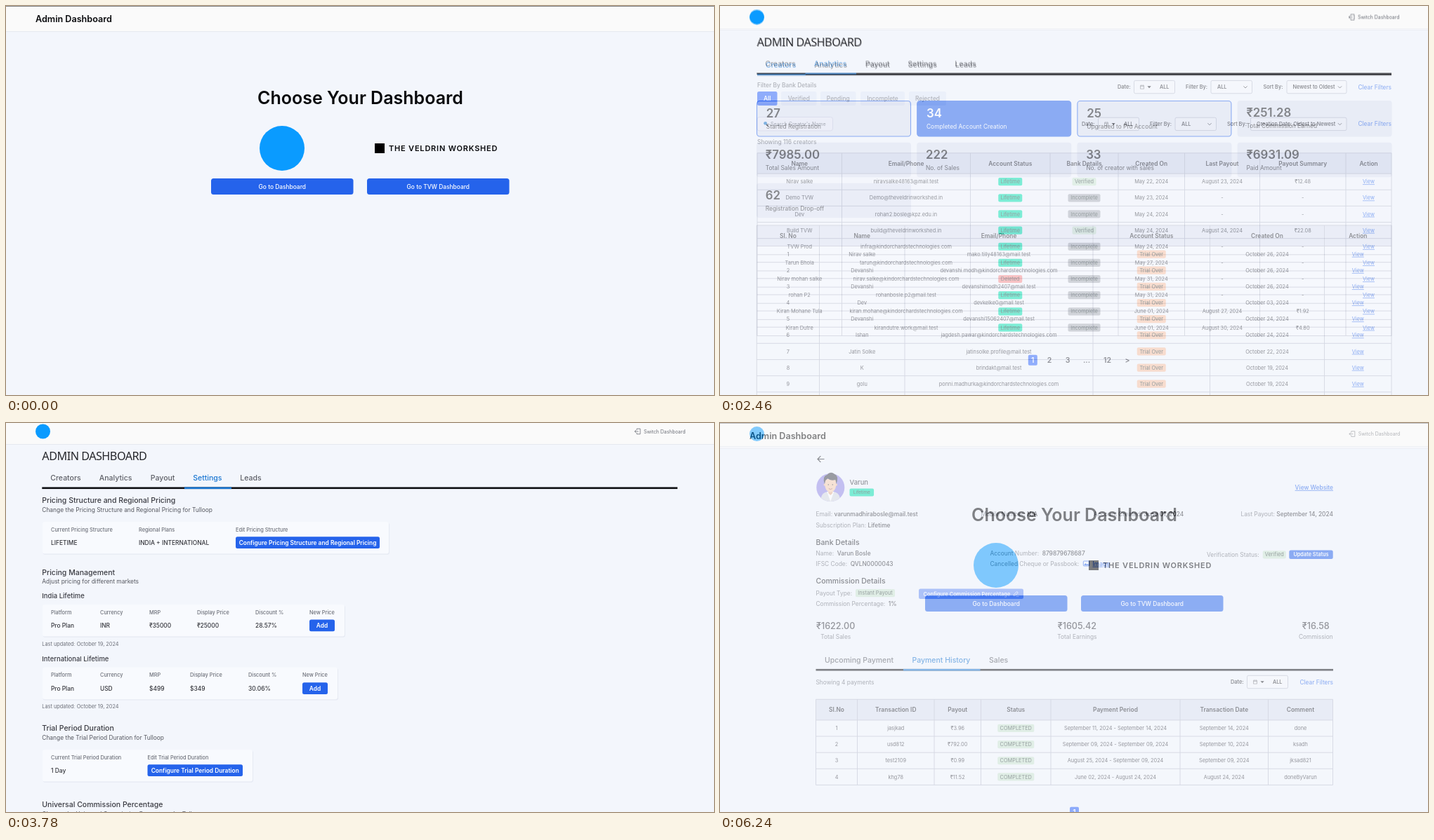
Animation, 1008 px wide and 555 px high, one loop 6300 ms. Source, as an HTML page:

```html
<!DOCTYPE html>
<html lang="en">
<head>
<meta charset="utf-8">
<title>Admin Dashboard</title>
<style>
html, body { margin: 0; width: 100%; height: 100%; overflow: hidden; background: #f3f6fc; }
svg { display: block; width: 1008px; height: 555px; }
text { font-family: Inter, sans-serif; white-space: pre; }
</style>
</head>
<body>
<svg id="stage" viewBox="0 0 1008 555" xmlns="http://www.w3.org/2000/svg"></svg>
<script>
const BLUE = '#2563eb', TAB = '#1976d2', INK = '#1c1c20', BODY = '#3a3b42', GREY = '#6d7079';
const HEAD = '#dfe4f2', LINE = '#b8bbcb', GREEN = '#05e3af', PALE = '#cfe8d2';
const S = 7.35, M = 8.4, L = 10.5;

// y is the middle of the capitals
function text(x, y, str, size = S, fill = BODY, weight = 400, anchor = 'start', extra = '') {
  return `<text x="${x}" y="${(y + size * 0.364).toFixed(2)}" font-size="${size}" fill="${fill}" font-weight="${weight}" text-anchor="${anchor}" ${extra}>${str}</text>`;
}
const mid = (x, y, str, size, fill, weight, extra) => text(x, y, str, size, fill, weight, 'middle', extra);
const rect = (x, y, w, h, fill, r = 0, extra = '') =>
  `<rect x="${x}" y="${y}" width="${w}" height="${h}" rx="${r}" fill="${fill}" ${extra}/>`;
const path = (d, stroke, w = 1, fill = 'none') =>
  `<path d="${d}" stroke="${stroke}" stroke-width="${w}" fill="${fill}"/>`;
const dot = (x, y, r, fill) => `<circle cx="${x}" cy="${y}" r="${r}" fill="${fill}"/>`;
const link = (x, y, str, size, weight = 400, anchor = 'middle') =>
  text(x, y, str, size, BLUE, weight, anchor, 'text-decoration="underline"');

function badge(x, y, w, str, fill, color = '#3b4a46', size = S) {
  return rect(x - w / 2, y - 5.6, w, 11.2, fill, 2) + mid(x, y, str, size, color);
}

function button(x, y, w, h, str, size = M, weight = 600, fill = BLUE, r = 2.5) {
  return rect(x, y, w, h, fill, r) + mid(x + w / 2, y + h / 2, str, size, '#fff', weight);
}

function backdrop(h, top = '') {
  return rect(0, 0, 1008, 555, '#f3f6fc') + rect(0, 0, 1008, h, '#fafafa') +
    rect(0, h, 1008, 0.8, '#e3e6ed') + top;
}

function topBar(h, y, dx = 0) {
  const x = 895.5 + dx;
  return backdrop(h) + dot(52.5, y, 10.5, '#0a9bff') +
    path(`M${x + 2.5} ${y - 1.8}V${y - 3.8}H${x + 7.5}V${y + 3.8}H${x + 2.5}V${y + 1.8}M${x + 5} ${y}H${x - 0.5}m2 -1.7l-2 1.7l2 1.7`, GREY, 0.8) +
    text(908 + dx, y, 'Switch Dashboard', 6.9, GREY);
}

function tabs(names, xs, y, active, lineY, x0, x1, a0, a1) {
  return names.map((n, i) => text(xs[i], y, n, L, i === active ? TAB : '#5d5f66', 500)).join('') +
    rect(x0, lineY - 1.3, x1 - x0, 2.6, '#0b0c10') + rect(a0, lineY - 1.3, a1 - a0, 2.6, TAB);
}

function mainTabs(x, titleY, y, active, lineY, a0, a1) {
  return text(x, titleY, 'ADMIN DASHBOARD', 16.2, '#26272b', 500, 'start',
      'style="font-family:\'Noto Sans\',sans-serif;letter-spacing:-.5px"') +
    tabs(['Creators', 'Analytics', 'Payout', 'Settings', 'Leads'],
      [12, 81.5, 154.5, 215, 282].map(d => d + x), y, active, lineY, x, 956, a0, a1);
}

const box = (x, y, w) => rect(x, y - 9.2, w, 18.4, '#f8f9fd', 2, `stroke="${LINE}" stroke-width=".9"`);
const chevron = (x, y) => path(`M${x - 2.6} ${y - 1.2}l2.6 2.6l2.6 -2.6`, '#33343a', 0.9);

function datePick(x, y) {
  return text(x, y, 'Date:', S, INK, 500) + box(x + 23.5, y, 58) +
    path(`M${x + 32.5} ${y - 2.2}h5v4.8h-5zM${x + 32.5} ${y - 0.8}h5M${x + 33.7} ${y - 3.2}v1M${x + 36.3} ${y - 3.2}v1`, '#55565c', 0.6) +
    path(`M${x + 42.5} ${y - 1.3}h5.2l-2.6 2.9z`, 'none', 0, INK) +
    text(x + 60, y, 'ALL', S, INK, 500);
}

function filters(x, y, sort, sortX) {
  return datePick(x, y) +
    text(x + 97, y, 'Filter By:', S, INK, 500) + box(x + 133, y, 58.5) +
    text(x + 142, y, 'ALL', S, INK, 500) + chevron(x + 182, y) +
    text(sortX - 33.5, y, 'Sort By:', S, INK, 500) + box(sortX, y, 892 - sortX) +
    text(sortX + 8.5, y, sort, S, INK, 500) + chevron(882.5, y) +
    text(956, y, 'Clear Filters', M, BLUE, 400, 'end');
}

const TONES = {
  Lifetime: [GREEN, 34], Deleted: ['#fb8c8c', 34], Verified: [PALE, 34], Incomplete: ['#adb0b8', 46],
  'Trial Over': ['#fcc3a2', 41], COMPLETED: [PALE, 52]
};

function table(cols, y, headH, heads, rows) {
  const rowH = 23.14, last = cols.length - 1, w = cols[last] - cols[0];
  const end = y + headH + rows.length * rowH;
  const cx = i => (cols[i] + cols[i + 1]) / 2;
  let out = rect(cols[0], y, w, end - y, '#f6f8fd') + rect(cols[0], y, w, headH, HEAD);
  let d = `M${cols[0]} ${y}h${w}`;
  for (let i = 0; i <= rows.length; i++) d += `M${cols[0]} ${y + headH + i * rowH}h${w}`;
  cols.forEach(x => d += `M${x} ${y}V${end}`);
  out += path(d, LINE, 0.9);
  heads.forEach((h, i) => out += mid(cx(i), y + headH / 2, h, M, '#292a30', 600));
  rows.forEach((row, r) => row.forEach((cell, i) => {
    const cy = y + headH + (r + 0.5) * rowH, tone = TONES[cell];
    out += tone ? badge(cx(i), cy, tone[1], cell, tone[0])
      : cell === 'View' ? link(cx(i), cy, cell, S) : mid(cx(i), cy, cell, S);
  }));
  return out;
}

function choosePage() {
  return backdrop(36, rect(0, 0, 1008, 1, '#85868a')) +
    text(42, 18.2, 'Admin Dashboard', 12.6, '#08090c', 600) +
    mid(504.5, 131, 'Choose Your Dashboard', 25, '#08090c', 600) +
    dot(393, 203, 32, '#0a9bff') + rect(525, 196, 14, 14, '#000') +
    text(545, 203, 'THE VELDRIN WORKSHED', 11, '#08090c', 600, 'start', 'letter-spacing=".8"') +
    button(292, 246, 202.5, 23, 'Go to Dashboard', M, 500, BLUE, 3.5) +
    button(514, 246, 202.5, 23, 'Go to TVW Dashboard', M, 500, BLUE, 3.5);
}

const MAIL = '@mail.test', FIRM = '@kindorchardstechnologies.com', SHED = '@theveldrinworkshed.in';

function creatorsPage() {
  const pill = (x, w, s) => rect(x, 122, w, 20, '#e4eaf8', 2.5) + mid(x + w / 2, 132, s, M, GREY, 500);
  const row = (name, mail, date, bank = 'Incomplete', paid = '-', sum = '-', state = 'Lifetime') =>
    [name, mail, state, bank, date + ', 2024', paid, sum, 'View'];
  const rows = [
    row('Nirav salke', 'niravsalke48163' + MAIL, 'May 22', 'Verified', 'August 23, 2024', '₹12.48'),
    row('Demo TVW', 'Demo' + SHED, 'May 23'),
    row('Dev', 'rohan2.bosle@kpz.edu.in', 'May 24'),
    row('Build TVW', 'build' + SHED, 'May 24', 'Verified', 'August 24, 2024', '₹22.08'),
    row('TVW Prod', 'infra' + FIRM, 'May 24'),
    row('Tarun Bhola', 'tarun' + FIRM, 'May 27'),
    row('Nirav mohan salke', 'nirav.salke' + FIRM, 'May 31', 'Incomplete', '-', '-', 'Deleted'),
    row('rohan P2', 'rohanbosle.p2' + MAIL, 'May 31'),
    row('Kiran Mohane Tula', 'kiran.mohane' + FIRM, 'June 01', 'Incomplete', 'August 27, 2024', '₹1.92'),
    row('Kiran Dutre', 'kirandutre.work' + MAIL, 'June 01', 'Incomplete', 'August 30, 2024', '₹4.80')
  ];
  const pages = [['2', 469], ['3', 495], ['...', 522], ['12', 551.5], ['&gt;', 580]];
  return topBar(34, 16.7) + mainTabs(53, 52, 84, 0, 98, 53, 121.8) +
    text(53, 113.3, 'Filter By Bank Details', M, GREY, 500) +
    button(53, 122, 28.5, 20, 'All', M, 600, '#2a62fb') +
    pill(87, 50.5, 'Verified') + pill(143, 50.5, 'Pending') + pill(200, 63, 'Incomplete') + pill(269, 53, 'Rejected') +
    rect(53, 158.5, 107.5, 19.5, '#fafaff', 3, 'stroke="#d5d5e6" stroke-width=".9"') +
    path('M66 168.8l2.6 2.6', '#33363d', 1.4) + dot(64.6, 167.3, 2.4, '#1f7fd0') +
    text(72, 168.3, "Search Creator's Name", 7.15, GREY) +
    filters(515, 168.4, 'Creation Date: Oldest to Newest', 755.5) +
    text(53, 194.3, 'Showing 116 creators', M, GREY, 500) +
    table([53, 173.5, 356.5, 470, 567, 661.5, 768.5, 891, 956], 209.8, 29.3,
      ['Name', 'Email/Phone', 'Account Status', 'Bank Details', 'Created On', 'Last Payout', 'Payout Summary', 'Action'], rows) +
    button(438.8, 497.8, 13, 15, '1', L, 600, '#2a62fb', 2) +
    pages.map(([s, x]) => mid(x, 505.4, s, L, '#303138', 600)).join('');
}

function analyticsPage() {
  const cards = [
    ['27', 'Started Registration', 1], ['34', 'Completed Account Creation', 2],
    ['25', 'Upgraded to Pro Account', 1], ['₹251.28', 'Total Commission Earned', 0],
    ['₹7985.00', 'Total Sales Amount', 0], ['222', 'No. of Sales', 0],
    ['33', 'No. of creator with sales', 0], ['₹6931.09', 'Paid Amount', 0],
    ['62', 'Registration Drop-off', 0]
  ].map(([num, label, kind], i) => {
    const x = 52 + (i % 4) * 228.2, y = [135, 194.8, 252.8][i >> 2], k = kind ? 1 : 0;
    const h = i < 4 ? 51.5 : 49.5;
    const frame = kind ? `stroke="${BLUE}" stroke-width="1.1"` : '';
    const [ink, sub] = kind === 2 ? ['#fff', '#fff'] : ['#15161a', '#26272c'];
    return rect(x + k / 2, y + k / 2, 220 - k, h - k, kind === 2 ? BLUE : HEAD, 4, frame) +
      text(x + 12.8 + k, y + 16.8 + k, num, 16.8, ink, 600) +
      text(x + 12.8 + k, y + 36.2 + k * 0.8, label, M, sub);
  }).join('');
  const rows = [
    ['Nirav salke', 'mako.tilly48163' + MAIL, 26], ['Devanshi', 'devanshi.modh' + FIRM, 26],
    ['Devanshi', 'devanshimodh2407' + MAIL, 26], ['Dev', 'devkelke0' + MAIL, '03'],
    ['Devanshi', 'devanshi15062407' + MAIL, 24], ['Ishan', 'jagdesh.pawar' + FIRM, 24],
    ['Jatin Solke', 'jatinsolke.profile' + MAIL, 22], ['K', 'brindakt' + MAIL, 19],
    ['golu', 'ponni.madhurka' + FIRM, 19], ['', '', 0]
  ].map(([name, mail, day], i) => day
    ? [i + 1, name, mail, 'Trial Over', `October ${day}, 2024`, 'View'] : []);
  return topBar(32, 15.2) + mainTabs(52.3, 51, 82.3, 1, 96.5, 121.5, 194) +
    filters(566, 115.6, 'Newest to Oldest', 807) + cards +
    table([52.3, 141.5, 263, 531, 697.5, 860.5, 956], 313, 29.5,
      ['Sl. No', 'Name', 'Email/Phone', 'Account Status', 'Created On', 'Action'], rows);
}

function settingsPage() {
  const card = (y, right) => rect(52.5, y + 1.2, right - 51.5, 45.5, '#e6eaf3', 3) +
    rect(52, y, right - 52, 45.5, '#f8fafe', 3);
  const label = (x, y, s) => text(x, y, s, S, GREY, 500);
  const value = (x, y, s) => text(x, y, s, M, '#34353b', 500);
  const section = (y, head, sub) => text(51.3, y, head, L, BODY, 500) + text(51.3, y + 13.4, sub, M, '#55575f');
  const change = s => `Change the ${s} for Tulloop`;
  const plan = (y, right, name, xs, vals) => text(51.3, y, name, 9.45, BODY, 500) + card(y + 12, right) +
    ['Platform', 'Currency', 'MRP', 'Display Price', 'Discount %', 'New Price']
      .map((s, i) => label(xs[i], y + 22.9, s)).join('') +
    vals.map((s, i) => value(xs[i], y + 42, s)).join('') +
    button(xs[5], y + 33.5, 36, 16.8, 'Add') +
    text(51.3, y + 68, 'Last updated: October 19, 2024', S, GREY);
  return topBar(30, 12) + mainTabs(51.3, 47, 78.5, 3, 92.8, 254, 321) +
    section(110.2, 'Pricing Structure and Regional Pricing', change('Pricing Structure and Regional Pricing')) +
    card(141, 545) + label(64, 152, 'Current Pricing Structure') + value(64, 170.7, 'LIFETIME') +
    label(189, 152, 'Regional Plans') + value(189, 170.7, 'INDIA + INTERNATIONAL') +
    label(327, 152, 'Edit Pricing Structure') +
    button(327, 162.3, 205, 16.8, 'Configure Pricing Structure and Regional Pricing') +
    section(212.7, 'Pricing Management', 'Adjust pricing for different markets') +
    plan(247, 482, 'India Lifetime', [64, 134, 204, 272, 355, 432], ['Pro Plan', 'INR', '₹35000', '₹25000', '28.57%']) +
    plan(336.7, 472, 'International Lifetime', [64, 134, 204, 262, 345, 422], ['Pro Plan', 'USD', '$499', '$349', '30.06%']) +
    section(435.3, 'Trial Period Duration', change('Trial Period Duration')) +
    card(466, 351) + label(64, 477, 'Current Trial Period Duration') + value(64, 496, '1 Day') +
    label(201.5, 477, 'Edit Trial Period Duration') +
    button(201.5, 487.3, 135.5, 16.8, 'Configure Trial Period Duration') +
    section(544.5, 'Universal Commission Percentage', change('Universal Commission Percentage'));
}

function avatar(x, y) {
  return `<g transform="translate(${x} ${y})">` + dot(0, 0, 20, '#9589e8') +
    path('M-13.5 14.7Q-12 7 -4 6H4Q12 7 13.5 14.7A20 20 0 0 1 -13.5 14.7z', 'none', 0, '#d9dbe2') +
    path('M-5 6L0 19.9L5 6z', 'none', 0, '#fff') +
    path('M-3 3H3V8L0 11L-3 8z', 'none', 0, '#eab28f') +
    dot(-8, -4, 1.8, '#f3c2a0') + dot(8, -4, 1.8, '#f3c2a0') +
    path('M-8 -12H8V-3Q7 6 0 7Q-7 6 -8 -3z', 'none', 0, '#f9d0b0') +
    path('M-8.5 -5Q-12 -16 -5 -18Q0 -24 6 -19Q12 -17 8.5 -5L7 -11Q0 -9 -4 -13L-7 -10z', 'none', 0, '#42434a') +
    dot(-3, -4, 0.8, '#42434a') + dot(3, -4, 0.8, '#42434a') +
    path('M-2.5 1.5Q0 3.8 2.5 1.5', '#a9645a', 0.9) + '</g>';
}

function detailPage() {
  const pair = (x, y, key, val, anchor) =>
    text(x, y, `${key}: <tspan fill="#34353b" font-weight="500">${val}</tspan>`, M, GREY, 400, anchor);
  const stat = (x, num, name) => mid(x, 289.5, num, 12.6, BODY, 500) + mid(x, 305, name, M, GREY);
  const head = (y, s) => text(136.5, y, s, L, '#26272c', 500);
  const row = (i, id, sum, span, day, note) => [i, id, '₹' + sum, 'COMPLETED', span, day + ', 2024', note];
  return topBar(33, 15.6, 0.8) +
    path('M148.5 51.5H139M143.3 47.2L139 51.5L143.3 55.8', '#26272c', 1.2) +
    avatar(157.3, 92) + text(184.5, 84.7, 'Varun', 9.45, BODY, 500) +
    badge(201.8, 99, 34.5, 'Lifetime', GREEN, '#2f4a44', 6.4) +
    link(873, 91.8, 'View Website', M, 500, 'end') +
    pair(136.5, 130.2, 'Email', 'varunmadhirabosle' + MAIL) + pair(371.5, 130.2, 'Mobile Number', 'N/A') +
    pair(532, 130.2, 'Account Created', 'June 01, 2024') + pair(873, 130.2, 'Last Payout', 'September 14, 2024', 'end') +
    pair(136.5, 145.7, 'Subscription Plan', 'Lifetime') +
    head(169.7, 'Bank Details') +
    pair(136.5, 186, 'Name', ' Varun Bosle') + pair(136.5, 200.5, 'IFSC Code', ' QVLN0000043') +
    pair(384.5, 186, 'Account Number', ' 879879678687') +
    text(384.5, 200.7, 'Cancelled Cheque or Passbook:', M, GREY) +
    rect(517.3, 197, 8.4, 7, 'none', 1, `stroke="${BLUE}" stroke-width=".9"`) +
    path('M518 203l2.4 -3l1.8 2l1.2 -1.2l2 2.2z', 'none', 0, BLUE) +
    link(530.5, 200.7, 'Image', M, 500, 'start') +
    text(693, 187.8, 'Verification Status:', M, GREY) + badge(789.3, 187.8, 33, 'Verified', PALE) +
    button(810.3, 181.5, 62.4, 12.6, 'Update Status', S) +
    head(225, 'Commission Details') +
    text(136.5, 242.6, 'Payout Type:', M, GREY) + badge(221, 242.6, 56, 'Instant Payout', PALE) +
    rect(283, 236.5, 149, 14.6, '#6a90f6', 2.5) +
    text(289.5, 243.9, 'Configure Commission Percentage', S, '#fff', 600) +
    path('M418 246.7l.5 -2l4.2 -4.2l1.6 1.6l-4.2 4.2zM421.5 247.2h4', '#fff', 0.8) +
    pair(136.5, 257.7, 'Commission Percentage', ' 1%') +
    stat(164.7, '₹1622.00', 'Total Sales') + stat(508.4, '₹1605.42', 'Total Earnings') + stat(848.3, '₹16.58', 'Commission') +
    tabs(['Upcoming Payment', 'Payment History', 'Sales'], [149, 273.5, 383], 338, 1, 352.2, 136.5, 873, 261, 370.5) +
    text(136.5, 369.6, 'Showing 4 payments', M, GREY) + datePick(727, 369.5) +
    text(873, 369.5, 'Clear Filters', M, BLUE, 400, 'end') +
    table([136.5, 195.5, 305, 371.5, 471, 655, 780.5, 872.5], 394.3, 29.6,
      ['Sl.No', 'Transaction ID', 'Payout', 'Status', 'Payment Period', 'Transaction Date', 'Comment'], [
        row(1, 'jasjkad', '3.96', 'September 11, 2024 - September 14, 2024', 'September 14', 'done'),
        row(2, 'usd812', '792.00', 'September 09, 2024 - September 09, 2024', 'September 10', 'ksadh'),
        row(3, 'test2109', '0.99', 'August 25, 2024 - September 09, 2024', 'September 09', 'jksad821'),
        row(4, 'khg78', '11.52', 'June 02, 2024 - August 24, 2024', 'August 24', 'doneByVarun')
      ]) +
    button(498, 547.8, 13, 15, '1', L, 600, '#2a62fb', 2);
}

const stage = document.getElementById('stage');
stage.innerHTML = [choosePage, creatorsPage, analyticsPage, settingsPage, detailPage]
  .map(page => `<g>${page()}</g>`).join('');
const pages = [...stage.children];
const HOLD = 1200, STEP = 1260;

// Each page holds, then mixes evenly with the next for one short step
function draw(ms) {
  const t = ms % (STEP * pages.length);
  const now = Math.floor(t / STEP);
  const next = t % STEP >= HOLD ? (now + 1) % pages.length : now;
  const upper = Math.max(now, next);
  pages.forEach((g, i) => {
    g.style.display = i === now || i === next ? '' : 'none';
    g.style.opacity = now !== next && i === upper ? 0.5 : 1;
  });
}

const start = performance.now();
function tick() {
  draw(performance.now() - start);
  requestAnimationFrame(tick);
}
draw(0);
requestAnimationFrame(tick);
</script>
</body>
</html>
```
